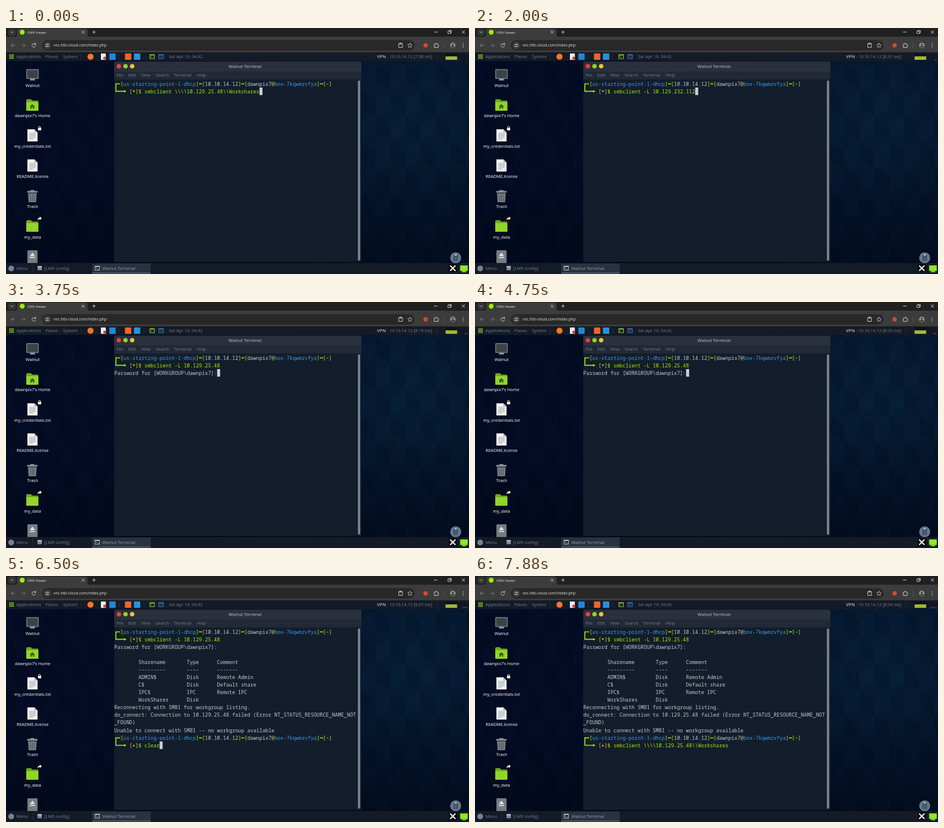
Write an HTML page that moves like this. It is 800 by 425 pixels and loops after 8 s.

```html
<!DOCTYPE html>
<html lang="en">
<head>
<meta charset="utf-8">
<title>Terminal session</title>
<style>
  html, body { margin: 0; width: 100%; height: 100%; overflow: hidden; background: #050b1c; }
  svg { display: block; width: 800px; height: 425px; }
  text { white-space: pre; }
  .ui { font: 7.4px "Noto Sans", sans-serif; fill: #6f7988; }
  .label { fill: #f2f4f7; text-anchor: middle; }
  .web { font: 6.75px "Open Sans", sans-serif; fill: #e3e3e3; }
  .term { font: 8.715px "Noto Sans Mono", monospace; fill: #c3c9d2; }
  .line { fill: none; stroke: #c7c7c7; stroke-width: 1; stroke-linecap: round; stroke-linejoin: round; }
</style>
</head>
<body>
<svg id="stage" viewBox="0 0 800 425" xmlns="http://www.w3.org/2000/svg">
  <defs>
    <pattern id="cubes" width="52" height="90" patternUnits="userSpaceOnUse" patternTransform="translate(14 62)">
      <rect width="52" height="90" fill="#06182c"/>
      <g id="tile"></g>
    </pattern>
    <radialGradient id="glow" gradientUnits="userSpaceOnUse" cx="700" cy="150" r="420">
      <stop offset="0" stop-color="#06223c" stop-opacity=".4"/>
      <stop offset=".35" stop-color="#03142a" stop-opacity=".5"/>
      <stop offset="1" stop-color="#020820" stop-opacity=".78"/>
    </radialGradient>
    <linearGradient id="floor" x2="0" y2="1">
      <stop offset=".5" stop-color="#020818" stop-opacity="0"/>
      <stop offset="1" stop-color="#020818" stop-opacity=".65"/>
    </linearGradient>
  </defs>

  <!-- wallpaper -->
  <rect y="42" width="800" height="383" fill="url(#cubes)"/>
  <rect y="42" width="800" height="383" fill="url(#glow)"/>
  <rect y="42" width="800" height="383" fill="url(#floor)"/>

  <g id="browser"></g>
  <g id="panel"></g>
  <g id="desktop"></g>

  <!-- terminal window -->
  <path d="M187 404V61q0-3 3-3H611q3 0 3 3V404Z" fill="#141d2b"/>
  <path d="M187 75V61q0-3 3-3H611q3 0 3 3V75Z" fill="#2a303c"/>
  <rect x="187" y="75" width="427" height="14" fill="#222936"/>
  <circle cx="195" cy="66" r="3.8" fill="#e8413d"/>
  <circle cx="206.500" cy="66" r="3.8" fill="#8fd624"/>
  <circle cx="218" cy="66" r="3.8" fill="#f5c23c"/>
  <text class="ui" x="413" y="69.300" text-anchor="middle" style="fill:#b9c0cb">Walnut Terminal</text>
  <g id="menu"></g>
  <rect x="608" y="90.500" width="4" height="311.500" rx="2" fill="#78818e"/>
  <g id="screen" class="term"></g>
  <rect id="cursor" width="5.200" height="13" fill="#c9ced6"/>

  <g id="taskbar"></g>
</svg>

<script>
const LOOP = 8000, CELL = 5.229, ROW = 13.08, LEFT = 187, TOP = 96.3;
const GREEN = '#9fef00', BLUE = '#3a9ae6', GREY = '#c3c9d2';
const $ = id => document.getElementById(id);
const rect = (x, y, w, h, fill, r = 0) =>
  `<rect x="${x}" y="${y}" width="${w}" height="${h}" rx="${r}" fill="${fill}"/>`;
const disc = (x, y, r, fill) => `<circle cx="${x}" cy="${y}" r="${r}" fill="${fill}"/>`;
const line = (d, color = '#c7c7c7', w = 1) =>
  `<path class="line" d="${d}" style="stroke:${color};stroke-width:${w}"/>`;
const shape = (d, fill) => `<path d="${d}" fill="${fill}"/>`;
const text = (x, y, s, cls = 'ui', style = '') =>
  `<text class="${cls}" x="${x}" y="${y}" style="${style}">${s}</text>`;

function drawCubes() {
  const cube = (x, y) =>
    shape(`M${x} ${y}l26 15v30l-26 -15Z`, '#051428') +
    shape(`M${x} ${y}l-26 15v30l26 -15Z`, '#071d35') +
    shape(`M${x} ${y}l26 15l26 -15l-26 -15Z`, '#06192f');
  let out = '';
  for (const [x, y] of [[0, 0], [52, 0], [26, 45], [-26, 45], [78, 45], [0, 90], [52, 90], [26, -45]])
    out += cube(x, y);
  $('tile').innerHTML = out;
}

function drawBrowser() {
  $('browser').innerHTML =
    rect(0, 0, 800, 42, '#1f2020') +
    rect(0, 15, 800, 27, '#3c3c3c') +
    shape('M16 15q3 0 3-3V5q0-4 4-4H137q4 0 4 4v7q0 3 3 3Z', '#3c3c3c') +
    rect(4, 1.5, 13, 12, '#343535', 4) +
    line('M8.500 6.300l2 2l2-2') +
    disc(28, 7.2, 4.2, '#9fef00') +
    text(37, 9.6, 'ORN Viewer', 'web', 'font-size:5.9px') +
    line('M131 5l4.500 4.500m0-4.500l-4.500 4.500', '#d5d5d5', .9) +
    line('M149.500 7h5m-2.500-2.500v5', '#d5d5d5', .9) +
    line('M740 7h5', '#e8e8e8', .9) +
    line('M764 5.500h4v4h-4ZM765.500 5.500v-1.300h4v4h-1.500', '#e8e8e8', .8) +
    line('M788 4.700l4.600 4.600m0-4.600l-4.600 4.600', '#e8e8e8', .9) +
    line('M15 30H9m2.800-2.800L9 30l2.800 2.800', '#808080') +
    line('M27 30h6m-2.800-2.800L33 30l-2.800 2.800', '#777') +
    line('M50.700 28a3.200 3.200 0 1 0 .6 2.800M51.200 26v2.400h-2.400') +
    rect(62, 21, 644, 18, '#282828', 9) +
    disc(71.5, 30, 6.5, '#3c3c3c') +
    line('M68.500 28.300h2.500m1.500 0h2M68.500 31.700h1.500m1.500 0h3', '#d6d6d6', .9) +
    line('M72 27.300v2M70.500 30.700v2', '#d6d6d6', .9) +
    text(82, 32.4, 'vnc.htb-cloud.com/index.php', 'web') +
    line('M679 27h6v6.500h-6ZM680.700 26h2.600v1.800h-2.600Z') +
    line('M698 26.200l1.200 2.500l2.700.3l-2 1.900l.5 2.700l-2.400-1.300l-2.400 1.300l.5-2.700l-2-1.900l2.700-.3Z', '#c7c7c7', .8) +
    disc(725, 30, 3.7, '#d9482f') +
    line('M740.500 27.800h1.800q0-1.700 1.200-1.700t1.200 1.700h1.800v1.800q1.500 0 1.500 1.200t-1.500 1.200v1.600h-6Z', '#d0d0d0') +
    rect(756.5, 25.5, .8, 9, '#5a5a5a') +
    disc(772, 30, 4.7, '#93958f') +
    disc(772, 28.6, 1.5, '#333') + shape('M769 33.500q0-3 3-3t3 3Z', '#333') +
    [27, 30, 33].map(y => disc(790, y, .8, '#d0d0d0')).join('');
}

function drawPanel() {
  let grid = '';
  for (let i = 0; i < 9; i++) grid += rect(5.7 + i % 3 * 2.8, 45.6 + (i / 3 | 0) * 2.8, 2, 2, '#8fd624');
  $('panel').innerHTML =
    rect(0, 42, 800, 15, '#141b27') + grid +
    text(18, 52.2, 'Applications') + text(68, 52.2, 'Places') + text(98.5, 52.2, 'System') +
    rect(129, 45, .7, 9, '#2b3341') +
    disc(146, 49.5, 5.3, '#f4762c') +
    rect(164, 44, 8.5, 11, '#eef0f2', 1) + disc(170.5, 52, 2.5, '#d93a3a') +
    rect(178.5, 44, 11, 11, '#2187d6', 1) +
    rect(195, 45, .7, 9, '#2b3341') +
    rect(205.5, 44, 11, 11, '#ed632d', 1) +
    rect(221, 44, 11, 11, '#2492db', 1) +
    rect(238, 45, .7, 9, '#2b3341') +
    rect(248, 45.5, 9, 8, '#8fd624', 1) + rect(249, 47.3, 7, 5.2, '#182130') +
    line('M250.300 48.700l1.200 1l-1.200 1', '#8fd624', .7) +
    rect(263.5, 45.5, 9, 8, '#3b82c4', 1) + rect(264.5, 47.3, 7, 5.2, '#182130') +
    line('M266 50h4', '#3b82c4', .7) +
    text(281.5, 52.2, 'Sat Apr 19, 04:42') +
    `<text class="ui" x="641" y="52.200"><tspan font-weight="700" fill="#98a2b0">VPN</tspan><tspan id="ping"></tspan></text>` +
    rect(744, 45, .7, 9, '#2b3341') +
    rect(759, 44, 20.5, 11.5, '#0c121c') + '<path id="load" fill="#a6b83a"/>' +
    rect(781, 45, 19, 11, '#111824') + '<g id="net"></g>';
}

function page(y) {
  let rows = '';
  for (let i = 0; i < 5; i++) rows += `M40.500 ${y + 7 + i * 2.4}h${i === 4 ? 6 : 10.5}`;
  return shape(`M37 ${y}h12l5.500 5.500V${y + 21}H37Z`, '#f1f2f4') +
    shape(`M49 ${y}v5.500h5.500Z`, '#b7bcc3') + line(rows, '#8f969f', .9);
}
const folder = y =>
  shape(`M35 ${y + 2}q0-2 2-2h6l2.500 2.500h8.500q2 0 2 2V${y + 19}H35Z`, '#6ea81d') +
  rect(35, y + 5, 21, 15, '#91d42c', 1);
const badge = y => disc(58, y, 5.3, '#0b0d11');

function drawDesktop() {
  const labels = ['Walnut', "dawnpix7's Home", 'my_credentials.txt', 'README.license', 'Trash', 'my_data'];
  $('desktop').innerHTML =
    rect(35, 71, 21.5, 17, '#777c82', 1.5) + rect(36.5, 72.5, 18.5, 14, '#3d4248') +
    shape('M42 88h7.500l1 2.500H41Z', '#9a9fa5') +
    folder(123) + shape('M45.500 131.500l4.500 4h-1.200v4h-2.300v-2.500h-2v2.500h-2.300v-4H41Z', '#38600c') +
    page(175) + badge(173.5) + rect(55.3, 172.8, 5.4, 4, '#fff', .5) +
    line('M56.300 173v-1.200q0-1.700 1.700-1.700t1.700 1.700v1.200', '#fff', 1) +
    page(227) +
    rect(36.5, 281.5, 18, 3, '#8b9096', 1) + rect(42, 280, 7, 2, '#8b9096', .8) +
    shape('M38 285.500H53l-1 15.500H39Z', '#767b82') +
    line('M42 288l.4 10.500M45.500 288v10.500M49 288l-.4 10.500', '#4a4f56', 1) +
    folder(332) + badge(329.5) +
    shape('M54.500 332q.2-4.300 4-4.300v-1.900l3.300 3l-3.300 3v-1.900q-2.500 0-4 2.100Z', '#fff') +
    rect(37, 384, 17.5, 24, '#777c82', 1.5) + shape('M45.700 388l4.500 6h-9Z', '#e0e3e6') +
    rect(41.2, 395.5, 9, 1.8, '#e0e3e6') +
    labels.map((s, i) => text(46, 101.7 + i * 52.4, s, 'ui label')).join('');

  const items = { 191: 'File', 211.5: 'Edit', 233.5: 'View', 258.5: 'Search', 290: 'Terminal', 329.5: 'Help' };
  $('menu').innerHTML = Object.entries(items).map(([x, s]) => text(x, 84.3, s)).join('');
}

function drawTaskbar() {
  $('taskbar').innerHTML =
    disc(777, 397, 9.5, '#62788f') + rect(773, 392, 8, 10.5, '#3c4e61', 1) +
    rect(775, 391, 4, 2.3, '#b4c1ce', .6) + line('M775 396h4M775 398.300h4M775 400.500h4', '#6e8297', .6) +
    rect(0, 406, 800, 19, '#141b27') +
    disc(9, 415.5, 5, '#77818f') + text(18, 418, 'Menu') +
    rect(46, 409, .7, 12, '#2b3341') +
    rect(54.5, 411.5, 7.5, 7, '#7f8a99', .6) + rect(54.5, 411.5, 7.5, 2, '#c3cad4', .6) +
    text(66, 418, '[LMR config]') +
    rect(149, 407, 101, 17, '#2a3240') + rect(149, 422.8, 101, 1.2, '#6b7482') +
    rect(153.5, 411, 8.5, 8, '#dbe0e6', .8) + rect(154.3, 412.6, 6.9, 5.6, '#1b2431') +
    line('M155.500 414l1.300 1l-1.300 1M158 416.500h2', '#dfe4ea', .7) +
    text(166.5, 418, 'Walnut Terminal', 'ui', 'fill:#8d97a5') +
    rect(765, 408, 14, 14, '#05070a', 2) + line('M768 411l8 8m0-8l-8 8', '#f4f4f4', 2.2) +
    rect(784.5, 410, 13.5, 10, '#7fd61f', 1) + rect(786, 411.5, 10.5, 7, '#93e632') +
    shape('M787 422l2-2h5l2 2Z', '#7fd61f');
}

// terminal content
const SHARE = 'smbclient \\\\\\\\10.129.25.48\\\\Workshares';
const LIST = 'smbclient -L 10.129.';
const ASK = 'Password for [WORKGROUP\\dawnpix7]:';
const REPLY = [
  ASK, '',
  ...[['Sharename', 'Type', 'Comment'], ['---------', '----', '-------'], ['ADMIN$', 'Disk', 'Remote Admin'],
    ['C$', 'Disk', 'Default share'], ['IPC$', 'IPC', 'Remote IPC'], ['WorkShares', 'Disk', '']]
    .map(([a, b, c]) => ' '.repeat(8) + a.padEnd(16) + b.padEnd(10) + c),
  'Reconnecting with SMB1 for workgroup listing.',
  'do_connect: Connection to 10.129.25.48 failed (Error NT_STATUS_RESOURCE_NAME_NOT',
  '_FOUND)',
  'Unable to connect with SMB1 -- no workgroup available'
];

// time, view, command being typed
const STEPS = [
  [0, 'first', SHARE], [1250, 'first', LIST + '232.112'],
  [2130, 'first', LIST + '232.1'], [2250, 'first', LIST + '232.'], [2380, 'first', LIST + '232'],
  [2500, 'first', LIST + '23'], [2630, 'first', LIST + '2'], [2750, 'first', LIST + '25'],
  [2880, 'first', LIST + '25.'], [3000, 'first', LIST + '25.4'], [3130, 'first', LIST + '25.48'],
  [3500, 'ask', ''],
  [5130, 'reply', ''], [5880, 'reply', LIST + '25.48'], [6250, 'reply', 'clear'], [7130, 'reply', SHARE]
];
const HIDDEN = [[630, 1130], [4130, 4630], [5130, 5500], [7750, LOOP]];
const PINGS = [[0, '7.98'], [1500, '8.31'], [3000, '8.19'], [4250, '8.03'], [5880, '8.07'], [7000, '8.04']];

const at = (table, t) => table.findLast(step => step[0] <= t);
const rowY = row => TOP + row * ROW;

function cells(row, col, parts) {
  const spans = parts.map(([s, fill]) => `<tspan fill="${fill}">${s}</tspan>`).join('');
  return `<text x="${LEFT + col * CELL}" y="${rowY(row) + 3.2}">${spans}</text>`;
}

function prompt(row, command) {
  const y = rowY(row), y2 = rowY(row + 1);
  return shape(`M189 ${y - .6}h8v1.600h-6.400V${y2 - .8}h13.500v-1.400l4 2.200l-4 2.200v-1.400H189Z`, GREEN) +
    cells(row, 2, [['[', GREEN], ['us-starting-point-1-dhcp', BLUE], [']', GREEN], [' ', GREEN], ['[', GREEN],
      ['10.10.14.12', GREY], [']', GREEN], [' ', GREEN], ['[', GREEN], ['dawnpix7', GREY], ['@', '#d6c23c'],
      ['box-7kqwmzvfya', BLUE], [']', GREEN], [' ', GREEN], ['[', GREEN], ['~', GREY], [']', GREEN]]) +
    [28, 42, 68].map(c => rect(LEFT + c * CELL, y - .6, CELL, 1.6, GREEN)).join('') +
    cells(row + 1, 5, [['[', GREEN]]) + cells(row + 1, 7, [[']$ ' + command, GREEN]]) +
    `<text x="${LEFT + 6.5 * CELL}" y="${y2 + 2}" text-anchor="middle" font-size="6" fill="#ffb52e">★</text>`;
}

function drawScreen([, view, command]) {
  let out = prompt(0, view === 'first' ? command : LIST + '25.48');
  let row = 1, col = 10 + command.length;
  if (view === 'ask') {
    out += cells(2, 0, [[ASK, GREY]]);
    row = 2;
    col = ASK.length;
  } else if (view === 'reply') {
    out += REPLY.map((s, i) => cells(i + 2, 0, [[s, GREY]])).join('') + prompt(14, command);
    row = 15;
  }
  $('screen').innerHTML = out;
  $('cursor').setAttribute('x', LEFT + col * CELL);
  $('cursor').setAttribute('y', rowY(row) - 6.5);
}

function drawMeters(tick) {
  let bars = '';
  for (let i = 0; i < 20; i++) {
    const h = 6 + .5 * Math.sin((i + tick) * 1.9) * Math.sin((i + tick) * .7);
    bars += `M${759.5 + i} 55v${-h}h1v${h}Z`;
  }
  $('load').setAttribute('d', bars);
  let dots = '';
  for (let i = 0; i < tick; i++) {
    const x = 798 - (tick - i) * 1.6;
    dots += rect(x, 54.5 - i % 3 * .6, 1, 1.3, i % 2 ? '#a8483f' : '#77808c');
  }
  $('net').innerHTML = dots;
}

drawCubes();
drawBrowser();
drawPanel();
drawDesktop();
drawTaskbar();

let shown, tick;
function frame() {
  const t = performance.now() % LOOP;
  const step = at(STEPS, t);
  if (step !== shown) drawScreen(shown = step);
  const visible = !HIDDEN.some(([a, b]) => t >= a && t < b);
  $('cursor').setAttribute('visibility', visible ? 'visible' : 'hidden');
  $('ping').textContent = ` - 10.10.14.12 [${at(PINGS, t)[1]} ms]`;
  const now = Math.floor(t / 1000);
  if (now !== tick) drawMeters(tick = now);
  requestAnimationFrame(frame);
}
frame();
</script>
</body>
</html>
```
